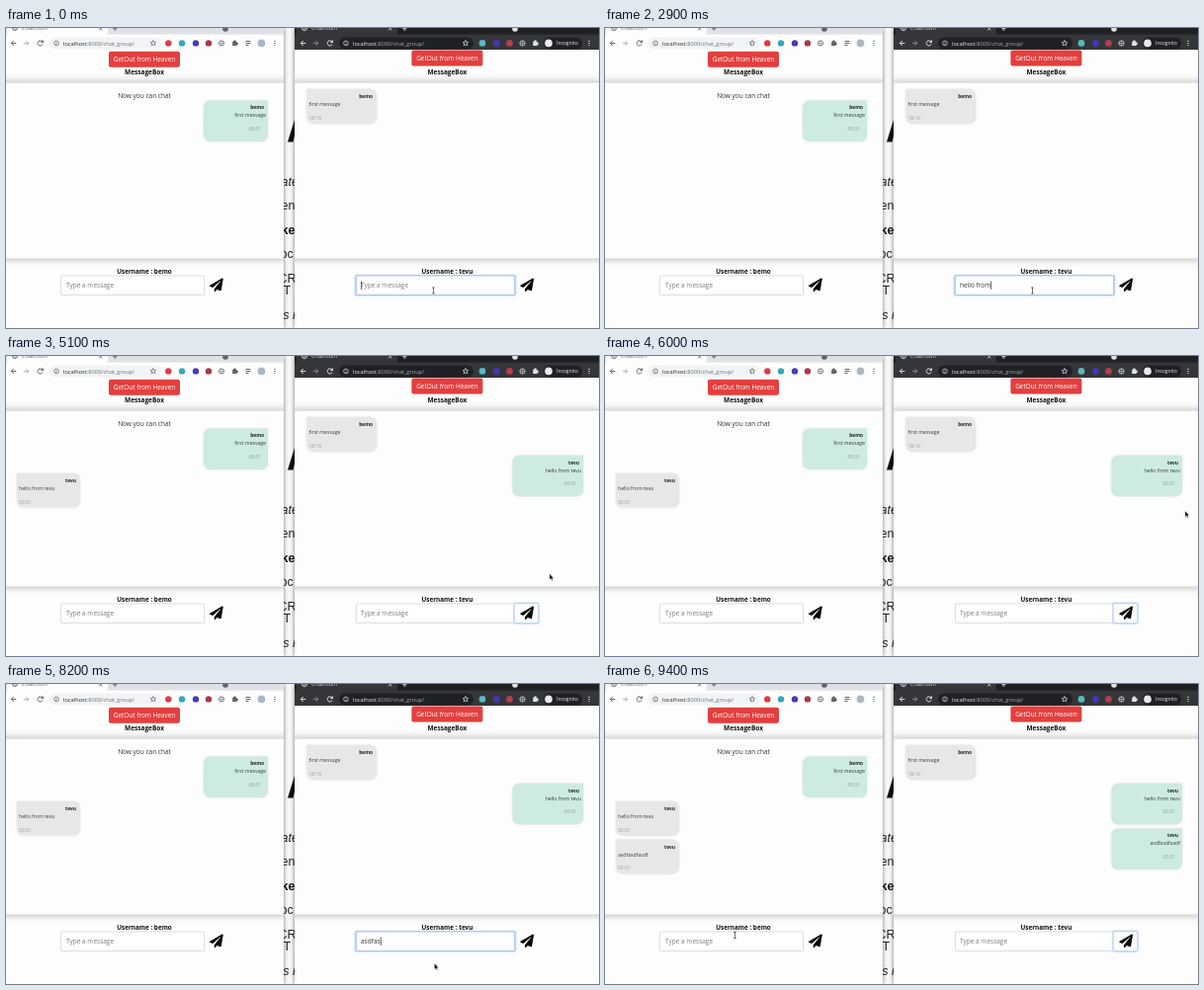
Recreate the animation shown at these times as an HTML page. Size 600 by 304 pixels, loop 9.5 s.

```html
<!DOCTYPE html>
<html lang="en">
<head>
<meta charset="utf-8">
<title>Chatroom</title>
<style>
  html, body { margin: 0; width: 100%; height: 100%; overflow: hidden; background: #fff; }
  svg { display: block; width: 600px; height: 304px; }
  text { font-family: "Open Sans", "Noto Sans", sans-serif; white-space: pre; }
  .back text { font-family: "Liberation Sans", Arial, sans-serif; }
  .window { filter: drop-shadow(0 0 2px #0008); }
  .panel { fill: #fefdfe; filter: drop-shadow(0 0 4px #0005); }
  .bubble { filter: drop-shadow(0 0 1px #0002); }
  .line { fill: none; stroke-width: 1; }
</style>
</head>
<body>
<svg viewBox="0 0 600 304">
  <defs>
    <clipPath id="leftWindow"><path d="M0 0h281v304H0z"/></clipPath>
    <clipPath id="rightWindow"><path d="M292 0h308v304H292z"/></clipPath>
    <path id="plane" d="M476 3L12 271c-18 10-16 35 2 43l107 44 287-253c6-5 14 3 9 8L176 407v80c0 24 28 33 42 16l64-77 125 52c14 6 30-3 33-18l72-432C515 8 493-7 476 3z"/>
  </defs>
  <g id="scene"></g>
  <g id="live"></g>
</svg>
<script>
const LOOP = 9500, STEP = 100;
const HOST = 'bemo', GUEST = 'tevu';
const GREEN = '#cdebe1', GREY = '#e8e6e8';
const HELLO = `hello from ${GUEST}`, MASH = 'asdfasdfasdf';
const scene = document.getElementById('scene');
const live = document.getElementById('live');

const text = (x, y, size, fill, value, extra = '') =>
  `<text x="${x}" y="${y}" font-size="${size}" fill="${fill}" ${extra}>${value}</text>`;
const rect = (x, y, w, h, fill, r = 0, extra = '') =>
  `<rect x="${x}" y="${y}" width="${w}" height="${h}" fill="${fill}" rx="${r}" ${extra}/>`;
const dot = (x, y, r, fill, extra = '') =>
  `<circle cx="${x}" cy="${y}" r="${r}" fill="${fill}" ${extra}/>`;
const line = (d, color, extra = '') => `<path class="line" d="${d}" stroke="${color}" ${extra}/>`;
const MIDDLE = 'text-anchor="middle"', END = 'text-anchor="end"', BOLD = 'font-weight="700"';
const ITALIC = 'font-style="italic"';
const BAR_Y = 15.4;

function globe(x, y, color) {
  return dot(x, y, 2.6, 'none', `stroke="${color}" stroke-width=".8"`) +
    line(`M${x - 2.6} ${y}h5.2M${x} ${y - 2.6}v5.2`, color, 'style="stroke-width:.5"');
}

function star(x, y, color) {
  let d = '';
  for (let i = 0; i < 10; i++) {
    const r = i % 2 ? 1.3 : 3, a = i * Math.PI / 5;
    d += `${i ? 'L' : 'M'}${x + r * Math.sin(a)} ${y - r * Math.cos(a)}`;
  }
  return line(d + 'z', color, 'style="stroke-width:.7"');
}

function puzzle(x, y, color) {
  return rect(x - 2.3, y - 1.8, 4.4, 4.4, color, .6) + dot(x, y - 2, 1.1, color) + dot(x + 2.3, y + .5, 1.1, color);
}

const menu = (x, y, color) => [-2.2, 0, 2.2].map(dy => dot(x, y + dy, .7, color)).join('');

// Tab strip, navigation arrows and address bar; x is the window's left edge.
function browserBar(x, width, pillEnd, dark) {
  const [strip, bar, pill, icon, dim, host, path] = dark
    ? ['#1f2023', '#35363a', '#202124', '#dfe1e5', '#85878b', '#f1f1f1', '#a5a8ad']
    : ['#dee1e6', '#fdfdfd', '#f1f3f4', '#5f6368', '#b4b7ba', '#26282b', '#6c7075'];
  const y = BAR_Y;
  return rect(x, 0, width, 22, bar) + rect(x, 0, width, 6.5, strip) +
    rect(x + 2, -6, 102, 13, bar, 3) +
    globe(x + 10, 0, icon) + text(x + 17, 2.4, 5.6, icon, 'Chatroom') +
    line(`M${x + 95} -1l3.4 3.4m0 -3.4l-3.4 3.4M${x + 109} .7h4.6m-2.3 -2.3v4.6`, icon, 'style="stroke-width:.8"') +
    dot(x + 223, 1, 2.8, icon) +
    line(`M${x + 11.3} ${y}h-5m2.5 -2.5l-2.5 2.5 2.5 2.5`, icon) +
    line(`M${x + 18.8} ${y}h5m-2.5 -2.5l2.5 2.5 -2.5 2.5`, dim) +
    line(`M${x + 38} ${y - 1.4}a2.6 2.6 0 1 0 .1 2.5M${x + 38.5} ${y - 3}v2.2h-2.2`, icon) +
    rect(x + 45, y - 6, pillEnd - x - 45, 12, pill, 6) +
    dot(x + 52, y, 2.4, 'none', `stroke="${icon}" stroke-width=".7"`) +
    line(`M${x + 52} ${y - .3}v1.7m0 -3v.7`, icon, 'style="stroke-width:.7"') +
    text(x + 59, y + 2.2, 5.7, host, `localhost<tspan fill="${path}">:8000/chat_group/</tspan>`) +
    star(pillEnd - 8, y, icon);
}

function page(x, width, mid, buttonY, user) {
  return rect(x, 22, width, 282, '#fdfdfe') +
    rect(mid - 36, buttonY, 72, 16, '#e33f3f', 2) +
    text(mid, buttonY + 10.2, 6.45, '#fff', 'GetOut from Heaven', MIDDLE) +
    text(mid, 46.6, 6.5, '#111', 'MessageBox', `${MIDDLE} ${BOLD}`) +
    `<rect class="panel" x="${x - 6}" y="55.5" width="${width + 12}" height="178"/>` +
    text(mid, 248.6, 6.35, '#111', `Username : ${user}`, `${MIDDLE} ${BOLD}`);
}

const plane = x => `<use href="#plane" transform="translate(${x} 253.5) scale(.0268)"/>`;

// A received bubble is grey with left-aligned text; a sent one is green and right-aligned.
function bubble(x, y, w, h, name, message, time, sent) {
  const r = 7.5, right = x + w;
  const corners = sent
    ? `M${x + r} ${y}H${right}V${y + h - r}q0 ${r} ${-r} ${r}H${x + r}q${-r} 0 ${-r} ${-r}V${y + r}q0 ${-r} ${r} ${-r}z`
    : `M${x} ${y}H${right - r}q${r} 0 ${r} ${r}V${y + h - r}q0 ${r} ${-r} ${r}H${x + r}q${-r} 0 ${-r} ${-r}z`;
  const align = sent ? END : '';
  return `<path class="bubble" d="${corners}" fill="${sent ? GREEN : GREY}"/>` +
    text(right - 4, y + 8.8, 4.9, '#222', name, `${END} ${BOLD}`) +
    text(sent ? right - 2 : x + 2, y + 16.8, 5.15, '#3a3d40', message, align) +
    text(sent ? right - 7 : x + 2, y + 30.6, 4.9, '#97a09e', time, align);
}

const field = (x, w, focused) =>
  (focused ? rect(x - 1.5, 249.7, w + 3, 22, '#c6dbf8', 2) : '') +
  rect(x + .4, 251, w - .8, 19.5, '#fff', 1, `stroke="${focused ? '#9bbdec' : '#d0d4d9'}" stroke-width=".8"`);
const placeholder = x => text(x, 263.3, 6.5, '#777d83', 'Type a message');

function drawScene() {
  const y = BAR_Y;
  const icons = [[164.3, '#dd3b46'], [178, '#3aa6b9'], [192, '#4a3fb0'], [205, '#a83a50']];
  const darkIcons = [[482, '#55bcc0'], [496.5, '#4438b4'], [509.5, '#b83c50']];
  const swatches = (list, r) => list.map(([x, fill]) => dot(x, y, r, fill)).join('');

  const behind = rect(281, 0, 11, 304, '#f8f8f9') +
    `<g class="back">` +
    `<path d="M292 93v16l-1.5 6.5h-5.5z" fill="#111"/>` +
    text(278.5, 159.5, 12.5, '#222', 'ate', ITALIC) +
    text(278.5, 183.5, 12.5, '#222', 'en') +
    text(278.5, 208.5, 12.5, '#111', 'ke', BOLD) +
    text(277.5, 233, 12.5, '#222', 'oc') +
    text(275.5, 257.5, 12.5, '#222', 'CR') +
    text(280.5, 269.8, 12.5, '#222', 'T') +
    text(277.5, 294.5, 12.5, '#222', 'is i', ITALIC) + '</g>';

  const left = page(0, 281, 140, 23.7, HOST) + browserBar(-1, 282, 157, false) +
    swatches(icons, 3.2) + globe(218, y, '#5f6368') + puzzle(231.5, y, '#5f6368') +
    line(`M242.5 ${y - 2}h5m-5 2h5m-5 2h3`, '#5f6368') + dot(258.5, y, 3.8, '#a9b7c4') + menu(272, y, '#5f6368') +
    text(140, 71.3, 6.5, '#333', 'Now you can chat', MIDDLE) +
    bubble(200, 73.5, 65, 41.5, HOST, 'first message', '00:01', true) +
    field(55, 146, false) + placeholder(61) + plane(206);

  const right = page(292, 308, 446.4, 22.5, GUEST) + browserBar(292, 308, 473, true) +
    swatches(darkIcons, 3.3) + globe(522.5, y, '#dfe1e5') + puzzle(535.5, y, '#dfe1e5') +
    rect(544, y - 6, 39, 12, '#202124', 6) + dot(549, y, 3.8, '#e8eaed') +
    text(557, y + 1.9, 5, '#f1f1f1', 'Incognito') + menu(590, y, '#dfe1e5') +
    bubble(304.5, 62, 70.5, 35, HOST, 'first message', '18:16', false);

  scene.innerHTML = behind +
    `<g class="window"><g clip-path="url(#leftWindow)">${left}</g></g>` +
    `<g class="window"><g clip-path="url(#rightWindow)">${right}</g></g>`;
}

// Key presses: '<' deletes one character.
const keys = [];
const press = (chars, times) => [...chars].forEach((char, i) => keys.push([times[i], char]));
press('hellop ', [100, 200, 300, 500, 600, 1000, 1800]);
press('<<', [2000, 2100]);
press(' from ', [2200, 2300, 2500, 2600, 2800, 3000]);
press(GUEST, [3300, 3400, 3500, 3600]);
press(MASH, [...MASH].map((_, i) => 7900 + Math.floor(i * .75) * 100));

const SENT = [4500, 9100];

function typed(t) {
  let value = '', last = t < 4000 ? 0 : 7800;
  if (t >= SENT[0] && t < 7800 || t >= SENT[1]) return { value, age: 0 };
  for (const [time, char] of keys) {
    if (time > t || (t >= 7800 && time < 7800)) continue;
    value = char === '<' ? value.slice(0, -1) : value + char;
    last = time;
  }
  return { value, age: t - last };
}

const pointerPath = [
  [0, 432.5, 266], [4000, 432.5, 266], [4300, 526, 262], [4800, 526, 262], [5500, 587, 157],
  [6000, 587, 157], [6400, 591, 165], [6900, 480, 262], [7200, 440, 296], [7500, 426, 256],
  [7800, 426, 256], [8100, 433.5, 283], [8900, 433.5, 283], [9000, 526, 262], [9100, 526, 262],
  [9300, 230, 287], [9400, 131.5, 254.5], [9500, 131.5, 254.5]
];

function pointer(t) {
  const i = pointerPath.findIndex(p => p[0] > t);
  const [t0, x0, y0] = pointerPath[i - 1], [t1, x1, y1] = pointerPath[i];
  const k = (t - t0) / (t1 - t0), ease = k * k * (3 - 2 * k);
  const x = x0 + (x1 - x0) * ease, y = y0 + (y1 - y0) * ease;
  const overField = y > 251 && y < 271 && (x > 354 && x < 515 || x > 55 && x < 201);
  return overField
    ? line(`M${x - 1.3} ${y - 3}h2.6m-1.3 0v6m-1.3 0h2.6`, '#222', 'style="stroke-width:.65"')
    : `<path d="M${x} ${y}v6.2l1.4 -1.3 1 2.2 .9 -.4 -1 -2.1h1.9z" fill="#111" stroke="#fff" stroke-width=".3"/>`;
}

function drawLive(t) {
  const fieldFocus = t < SENT[0] || t >= 7800 && t < SENT[1];
  const sendFocus = t >= SENT[0] && t < 7000 || t >= SENT[1];
  const { value, age } = typed(t);
  let out = '';

  [[HELLO, 119, 100.7], [MASH, 157.7, 146.5]].forEach(([message, leftY, rightY], i) => {
    if (t < SENT[i] + 100) return;
    out += bubble(11, leftY, 64, 34.5, GUEST, message, '00:01', false) +
      bubble(512.5, rightY, 71.5, 41.5, GUEST, message, '00:01', true);
  });

  out += field(354, 161, fieldFocus);
  if (sendFocus) out += rect(514, 250.3, 25, 20.7, '#fdfdfe', 1.5, 'stroke="#b4cff4" stroke-width="1.3"');
  out += plane(520.3);
  out += value ? text(359, 263.3, 6.5, '#33383d', value, 'id="typed"') : placeholder(359);
  if (t >= 1300 && t < 2100) out += line('M359 265h19', '#555', 'style="stroke-width:.6"');
  if (fieldFocus && age % 1060 < 530) out += rect(359, 256.5, .7, 8.5, '#222', 0, 'id="caret"');
  live.innerHTML = out + pointer(t);

  const caret = document.getElementById('caret'), label = document.getElementById('typed');
  if (caret && label) caret.setAttribute('x', 359.2 + label.getComputedTextLength());
}

drawScene();
let shown = -1;
function tick() {
  const t = Math.floor(performance.now() % LOOP / STEP) * STEP;
  if (t !== shown) drawLive(shown = t);
  requestAnimationFrame(tick);
}
tick();
</script>
</body>
</html>
```
